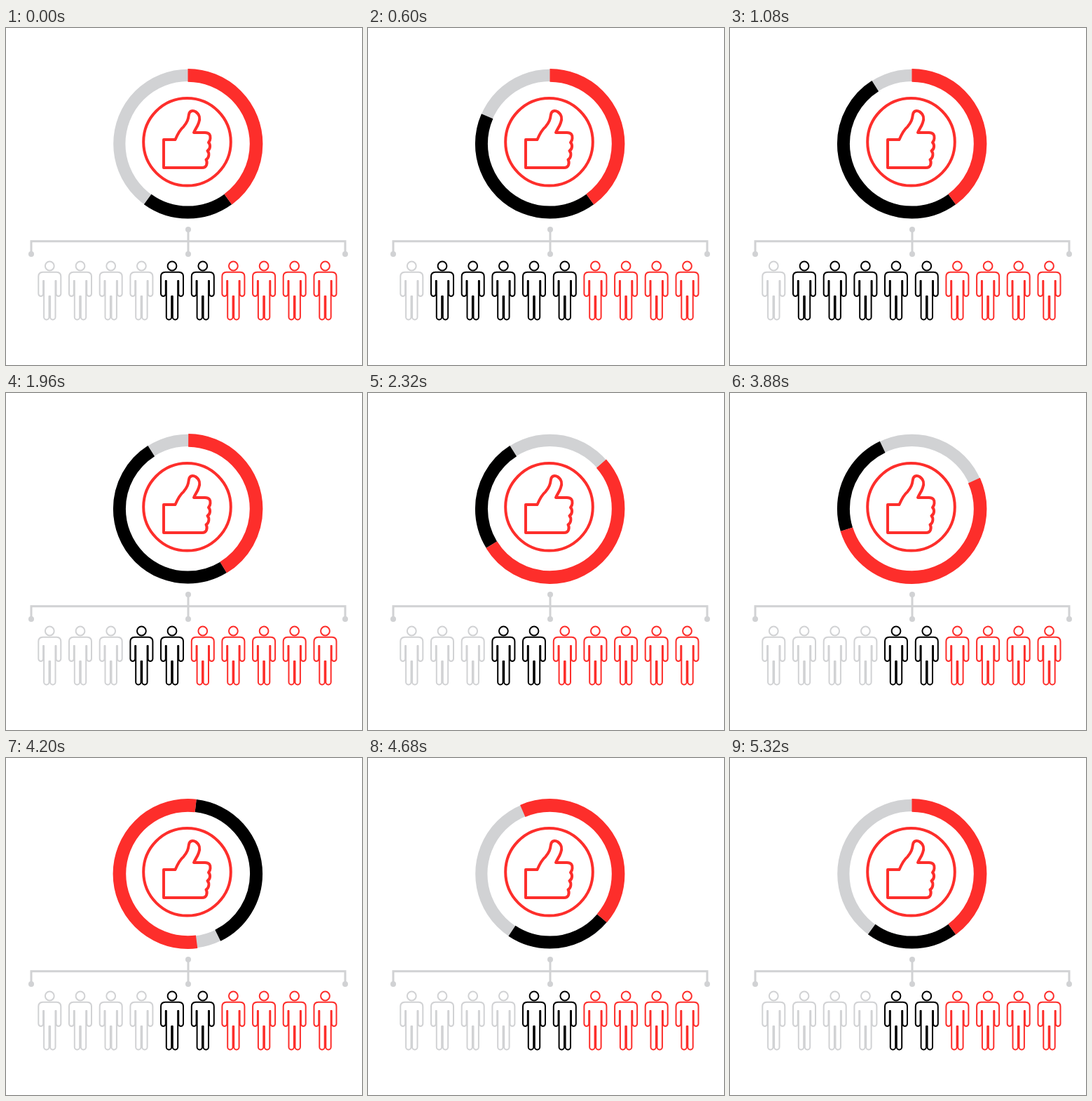
Animation of 508 by 480 pixels, one loop 6040 ms. Source, as an HTML page:

```html
<!DOCTYPE html>
<html lang="en">
<head>
<meta charset="utf-8">
<title>Approval ring</title>
<style>
  @property --a { syntax: "<number>"; inherits: true; initial-value: 0; }
  @property --b { syntax: "<number>"; inherits: true; initial-value: 144; }
  @property --c { syntax: "<number>"; inherits: true; initial-value: 216; }

  :root { --red: #fd2e2b; --gray: #d1d2d4; --loop: 6040ms; }
  html, body { margin: 0; width: 100%; height: 100%; overflow: hidden; background: #fff; }
  svg { display: block; width: 100%; height: 100%; fill: none; }

  /* Angles in degrees clockwise from the top: red a-b, black b-c, gray the rest. */
  .ring {
    animation: redStart var(--loop) infinite, redEnd var(--loop) infinite, blackEnd var(--loop) infinite;
    animation-timing-function: cubic-bezier(.45, 0, 0, 1);
  }
  .arc {
    stroke-dasharray: calc(var(--len) * 1px) calc((360 - var(--len)) * 1px);
    stroke-dashoffset: calc(var(--from) * -1px);
  }
  .black { --from: var(--b); --len: (var(--c) - var(--b)); stroke: #000; stroke-width: 18; }
  .red { --from: var(--a); --len: (var(--b) - var(--a)); stroke: var(--red); stroke-width: 18.6; }

  @keyframes redStart {
    0%, 31.457% { --a: 0; }
    48.675%, 63.411% { --a: 64.8; }
    86.921%, 100% { --a: 360; }
  }
  @keyframes redEnd {
    0%, 30.464% { --b: 144; }
    45.695%, 63.576% { --b: 252; }
    84.768%, 100% { --b: 504; }
  }
  @keyframes blackEnd {
    0%, 5.298% { --c: 216; }
    17.881%, 62.252% { --c: 327.6; }
    80.381%, 100% { --c: 576; }
  }

  .people { stroke-width: 2; stroke-linejoin: round; stroke: var(--gray); }
  .people .on { stroke: #000; }
  .people .yes { stroke: var(--red); }
  .p1, .p2, .p3, .p5 { animation: var(--loop) step-end infinite; }
  .p1 { animation-name: second; }
  .p2 { animation-name: third; }
  .p3 { animation-name: fourth; }
  .p5 { animation-name: sixth; }
  @keyframes second { 0%, 27.15% { stroke: var(--gray); } 3.31% { stroke: #000; } 100% { stroke: var(--gray); } }
  @keyframes third { 0%, 28.47% { stroke: var(--gray); } 1.98% { stroke: #000; } 100% { stroke: var(--gray); } }
  @keyframes fourth { 0%, 58.94% { stroke: var(--gray); } .66% { stroke: #000; } 100% { stroke: var(--gray); } }
  @keyframes sixth { 0%, 60.26% { stroke: #000; } 25.82% { stroke: var(--red); } 100% { stroke: #000; } }
</style>
</head>
<body>
<svg viewBox="0 0 508 480">
  <defs>
    <g id="person">
      <circle cy="339" r="6.4"/>
      <path d="M-10 347.8H10Q16 348 16 354V378.6A3.4 3.4 0 0 1 9.2 378.6V360H8.2V411.8A3.7 3.7 0 0 1 .8 411.8V382H-.8V411.8A3.7 3.7 0 0 1-8.2 411.8V360H-9.2V378.6A3.4 3.4 0 0 1-16 378.6V354Q-16 348-10 347.8Z"/>
    </g>
  </defs>

  <g class="ring" transform="translate(259.5 165) rotate(-90)">
    <circle r="97.7" stroke="#d1d2d4" stroke-width="17.2"/>
    <circle class="arc black" r="97.6" pathLength="360"/>
    <circle class="arc red" r="97.6" pathLength="360"/>
  </g>

  <g stroke="#fd2e2b" stroke-width="4" stroke-linejoin="round">
    <circle cx="258.5" cy="162.3" r="62.3"/>
    <path d="M225 159H241.5C245 151 248 145 253 141C259 134 260 130 261 123C262 117.500 267 117 271 119.500C276 123 277.500 129 275 135C273 141 270 144 268 149H284C290 149 292 152.500 291.500 157Q291.500 160 289 163C292 166 292 172 287.500 175C290.500 178 290 185 285.500 187.500C288 192 286.500 199 280 199H225Z"/>
  </g>

  <g stroke="#d1d2d4" stroke-width="3">
    <path d="M36 322V303.700H484V322M260 287V322"/>
    <g fill="#d1d2d4" stroke="none">
      <circle cx="260" cy="287" r="4"/>
      <circle cx="36" cy="322" r="4"/>
      <circle cx="260" cy="322" r="4"/>
      <circle cx="484" cy="322" r="4"/>
    </g>
  </g>

  <g class="people">
    <use href="#person" x="62.300"/>
    <use href="#person" x="106" class="p1"/>
    <use href="#person" x="149.700" class="p2"/>
    <use href="#person" x="193.400" class="p3"/>
    <use href="#person" x="237" class="on"/>
    <use href="#person" x="280.800" class="on p5"/>
    <use href="#person" x="324.400" class="yes"/>
    <use href="#person" x="368.100" class="yes"/>
    <use href="#person" x="411.700" class="yes"/>
    <use href="#person" x="455.500" class="yes"/>
  </g>
</svg>
</body>
</html>
```
